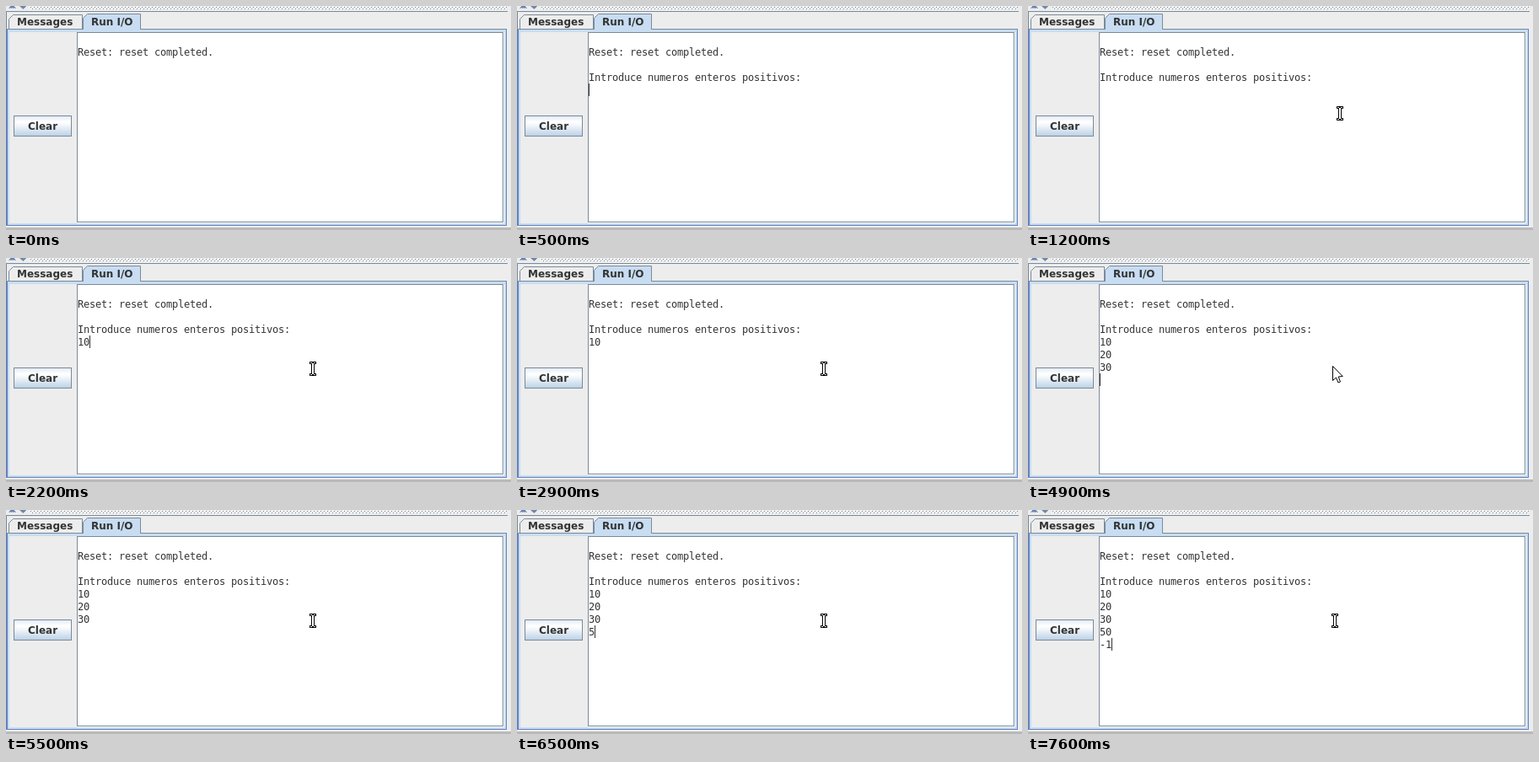
Recreate the animation shown at these times as an HTML page with a canvas. Size 599x266 px, loop 8 s.

```html
<!DOCTYPE html>
<html lang="es">
<head>
<meta charset="utf-8">
<title>Run I/O</title>
<style>
html, body { margin: 0; width: 100%; height: 100%; overflow: hidden; background: #eee; }
canvas { display: block; }
</style>
</head>
<body>
<canvas id="stage" width="599" height="266"></canvas>
<script>
const ctx = document.getElementById('stage').getContext('2d');
const LOOP = 8000;
const COL = 7, ROW = 15, LEFT = 85, TOP = 32, ASCENT = 12;
const LINE = '#7a8a99', BLUE = '#6382bf', TAB = '#c8ddf2', PANEL = '#ededed', INK = '#333';

const intro = '\nReset: reset completed.\n';
const prompt = intro + '\nIntroduce numeros enteros positivos:\n';

// start time, console text, caret visible
const cues = [
  [0, intro, false],
  [500, prompt, true],
  [1000, prompt, false],
  [1600, prompt, true],
  [2000, prompt, false],
  [2100, prompt + '1', true],
  [2200, prompt + '10', true],
  [2500, prompt + '10\n', true],
  [2900, prompt + '10\n', false],
  [3700, prompt + '10\n', true],
  [4000, prompt + '10\n2', true],
  [4100, prompt + '10\n20', true],
  [4300, prompt + '10\n20\n', true],
  [4600, prompt + '10\n20\n3', true],
  [4700, prompt + '10\n20\n30', true],
  [4900, prompt + '10\n20\n30\n', true],
  [5500, prompt + '10\n20\n30\n', false],
  [6000, prompt + '10\n20\n30\n', true],
  [6500, prompt + '10\n20\n30\n5', true],
  [6600, prompt + '10\n20\n30\n50', true],
  [6800, prompt + '10\n20\n30\n50\n', true],
  [7300, prompt + '10\n20\n30\n50\n', false],
  [7600, prompt + '10\n20\n30\n50\n-1', true]
];

// start time, pointer kind, x, y
const pointer = [
  [0, null],
  [1000, ibeam, 397, 67],
  [1100, ibeam, 379, 98],
  [1200, ibeam, 366, 119],
  [1300, ibeam, 360, 123],
  [2500, arrow, 361, 128],
  [2600, ibeam, 360, 123],
  [4900, arrow, 361, 128],
  [5000, ibeam, 360, 123]
];

const at = (list, t) => list.filter(item => item[0] <= t).pop();

function box(color, x, y, w, h) {
  ctx.fillStyle = color;
  ctx.fillRect(x, y, w, h);
}

function frame(color, x, y, w, h) {
  ctx.strokeStyle = color;
  ctx.lineWidth = 1;
  ctx.strokeRect(x + .5, y + .5, w - 1, h - 1);
}

function poly(points, fill, stroke) {
  ctx.beginPath();
  points.forEach(([x, y]) => ctx.lineTo(x + .5, y + .5));
  if (fill) { ctx.fillStyle = fill; ctx.fill(); }
  if (stroke) { ctx.strokeStyle = stroke; ctx.lineWidth = 1; ctx.stroke(); }
}

function label(text, x, y) {
  ctx.font = 'bold 12px "DejaVu Sans", sans-serif';
  ctx.fillStyle = INK;
  ctx.fillText(text, x, y);
}

function divider() {
  for (let y = 0; y < 5; y++) {
    for (let x = 28; x < 594; x++) {
      const k = (x - y + 8) % 4;
      if (k === 0) box(y % 2 ? LINE : '#fff', x, y, 1, 1);
    }
  }
  poly([[3, 2], [7, -2], [11, 2]], BLUE, LINE);
  poly([[16, 0], [23, 0], [19.5, 3]], BLUE, LINE);
  box(LINE, 0, 6, 595, 1);
}

function tab(x, y, right, fill) {
  poly([[x, 27], [x, y + 5], [x + 5, y], [right, y], [right, 27]], fill, LINE);
}

function button() {
  const g = ctx.createLinearGradient(0, 130, 0, 155);
  g.addColorStop(0, '#dde8f3');
  g.addColorStop(.3, '#fff');
  g.addColorStop(.45, '#f4f8fb');
  g.addColorStop(1, '#b8cfe5');
  box(g, 9, 130, 69, 25);
  frame(LINE, 9, 130, 69, 25);
  label('Clear', 26, 147);
}

function chrome() {
  box(PANEL, 0, 0, 599, 266);
  divider();

  box(TAB, 0, 27, 594, 234);
  box(PANEL, 4, 31, 587, 227);
  frame(LINE, 0, 27, 594, 234);
  box(BLUE, 0, 27, 2, 234);
  box(BLUE, 593, 27, 1, 234);
  box(BLUE, 0, 260, 594, 1);
  box(LINE, 0, 6, 1, 22);
  box('#b9b9b9', 0, 263, 599, 3);

  tab(3, 10, 90, PANEL);
  box(LINE, 0, 27, 92, 1);
  tab(91, 9, 159, TAB);
  box(TAB, 92, 27, 67, 1);
  label('Messages', 13, 23);
  label('Run I/O', 101, 23);
  button();

  box('#fff', 84, 31, 507, 227);
  frame(LINE, 84, 31, 506, 226);
}

function consoleText(text, caret) {
  const lines = text.split('\n');
  ctx.font = '12px "DejaVu Sans Mono", monospace';
  ctx.fillStyle = INK;
  lines.forEach((line, row) => {
    [...line].forEach((ch, i) => ctx.fillText(ch, LEFT + i * COL, TOP + row * ROW + ASCENT));
  });
  if (caret) {
    const row = lines.length - 1;
    box(INK, LEFT + lines[row].length * COL, TOP + row * ROW, 1, ROW);
  }
}

function ibeam(x, y) {
  box('#000', x, y, 8, 3);
  box('#000', x, y + 14, 8, 3);
  box('#000', x + 2, y + 2, 4, 13);
  box('#fff', x + 1, y + 1, 2, 1);
  box('#fff', x + 5, y + 1, 2, 1);
  box('#fff', x + 1, y + 15, 2, 1);
  box('#fff', x + 5, y + 15, 2, 1);
  box('#fff', x + 3, y + 2, 2, 13);
}

function arrow(x, y) {
  const shape = [[0, 0], [0, 17], [4, 13.5], [6.5, 19.5], [9, 18.5], [6.7, 12.5], [11.7, 12], [0, 0]];
  ctx.lineJoin = 'miter';
  poly(shape.map(([dx, dy]) => [x + dx, y + dy]), '#fff', '#000');
}

function draw(now) {
  const t = now % LOOP;
  const [, text, caret] = at(cues, t);
  const [, shape, x, y] = at(pointer, t);
  chrome();
  consoleText(text, caret);
  if (shape) shape(x, y);
}

const start = performance.now();
function tick() {
  draw(performance.now() - start);
  requestAnimationFrame(tick);
}
tick();
</script>
</body>
</html>
```
